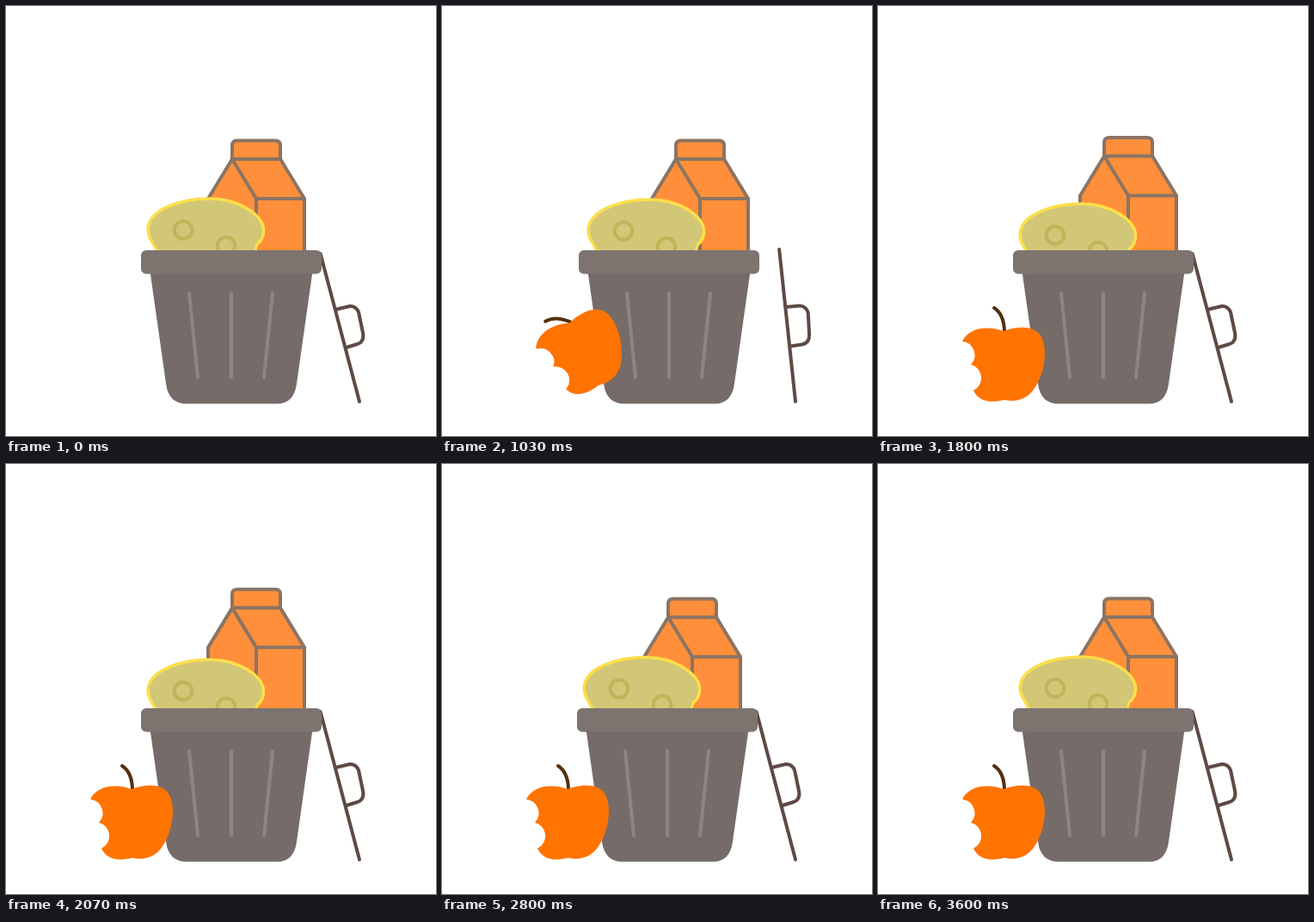
Recreate the animation shown at these times as an HTML page. Size 500x500 px, loop 3.63 s.

```html
<!DOCTYPE html>
<html lang="en">
<head>
<meta charset="utf-8">
<title>Food waste bin</title>
<style>
  html, body { margin: 0; width: 100%; height: 100%; overflow: hidden; background: #fff; }
  svg { display: block; width: 100vw; height: 100vh; }
  path { stroke-linecap: round; stroke-linejoin: round; }
</style>
</head>
<body>
<svg viewBox="0 0 500 500">
  <g id="lid" fill="none" stroke="#5d4a45" stroke-width="4">
    <path d="M365.6 288L411 460"/>
    <path d="M383 353L400 349Q407 349 410 356L415 380Q417 390 409 393L396 397"/>
  </g>

  <g id="milk" stroke="#8b7464" stroke-width="4">
    <path fill="#ff8f3a" d="M263 178V162Q263 156.500 269 156.500H313Q319 156.500 319 162V178L347 224V305H235V224Z"/>
    <path fill="none" d="M263 178H319M263 178L291 224H347M291 224V305"/>
  </g>

  <g id="cheese" fill="#d2c677">
    <path stroke="#fbdf4b" stroke-width="3.500" d="M180 300C177 278 165 274 165 259C167 236 203 224 237 224C270 224 297 242 299.500 259C300 267 297 273 292 277Q289 283 292 300Z"/>
    <g stroke="#c2b458" stroke-width="4">
      <circle cx="206" cy="260.500" r="10.300"/>
      <circle cx="256" cy="279" r="10.300"/>
    </g>
  </g>

  <g id="bin">
    <path fill="#756b68" d="M167 305H357L338 439Q335 462.500 315 462.500H210Q189 462.500 186 439Z"/>
    <rect x="157" y="284" width="210" height="27.500" rx="6" fill="#7d7470"/>
    <path fill="none" stroke="#8e8582" stroke-width="4" d="M213 334L223 432M262 334V432M310 334L300 432"/>
  </g>

  <g id="apple">
    <path id="stem" fill="none" stroke="#54300f" stroke-width="4" d="M147 377Q146 358 135 351"/>
    <path fill="#ff7300" d="M98 390C104 376 124 370 146 378C166 371 182 373 189 383C198 397 194 426 183 443C174 457 162 461 147 458C130 462 117 460 111 447A16 16 0 0 0 108 417A16 16 0 0 0 98 390Z"/>
  </g>
</svg>

<script>
const LOOP = 3630, ENTER = 330, HIT = 830, SETTLE = 1300;
const [lid, milk, cheese, bin, apple, stem] =
  ["lid", "milk", "cheese", "bin", "apple", "stem"].map(id => document.getElementById(id));

// Progress from 0 to 1 between two times
const ramp = (t, from, to) => Math.min(1, Math.max(0, (t - from) / (to - from)));
// Smooth rise to 1 and back to 0
const bump = (t, from, to) => Math.sin(Math.PI * ramp(t, from, to)) ** 2;

const move = (el, x, y) => el.setAttribute("transform", `translate(${x} ${y})`);
const spin = (el, deg, x, y) => el.setAttribute("transform", `rotate(${deg} ${x} ${y})`);

// Rolls in with slight acceleration; the turn follows the distance
function roll(t) {
  const s = t - ENTER;
  const x = -52 + 0.3215 * s + 0.00018 * s * s;
  return { x, y: 410 + 5 * ramp(t, ENTER, HIT), turn: -38 + (x - 154) * 1.255 };
}

// Hops against the bin and drops back upright
function rebound(u) {
  const left = 1 - u, arc = Math.sin(Math.PI * u);
  return { x: 147 + 7 * left + 14.4 * arc, y: 417 - 2 * left - 12.5 * arc, turn: -38 * left ** 0.83 };
}

function drawApple(t) {
  apple.style.display = t < ENTER ? "none" : "";
  const u = ramp(t, HIT, SETTLE);
  const { x, y, turn } = t < HIT ? roll(t) : rebound(u);
  apple.setAttribute("transform", `translate(${x} ${y}) rotate(${turn}) translate(-147 -417)`);
  spin(stem, -42 * (1 - u ** 4), 147, 377);
}

// A hop followed by a fading wobble
function milkY(t) {
  const s = Math.max(0, t - 2255);
  return -14 * bump(t, 1710, 2255) + 7 * Math.exp(-s / 180) * Math.sin(2 * Math.PI * s / 400);
}

// Sinks, then eases back up
function cheeseY(t) {
  const p = ramp(t, 1400, 1800);
  return 6 * p * p * (3 - 2 * p) * Math.exp(-Math.max(0, t - 1800) / 500);
}

function draw(t) {
  const push = bump(t, 850, 1210);
  move(bin, 2 * push, 0);
  move(milk, 9 * push, milkY(t));
  move(cheese, 5 * push, push + cheeseY(t));
  spin(lid, 8.7 * push, 411, 460);
  drawApple(t);
}

const start = performance.now();
function tick() {
  draw((performance.now() - start) % LOOP);
  requestAnimationFrame(tick);
}
tick();
</script>
</body>
</html>
```
